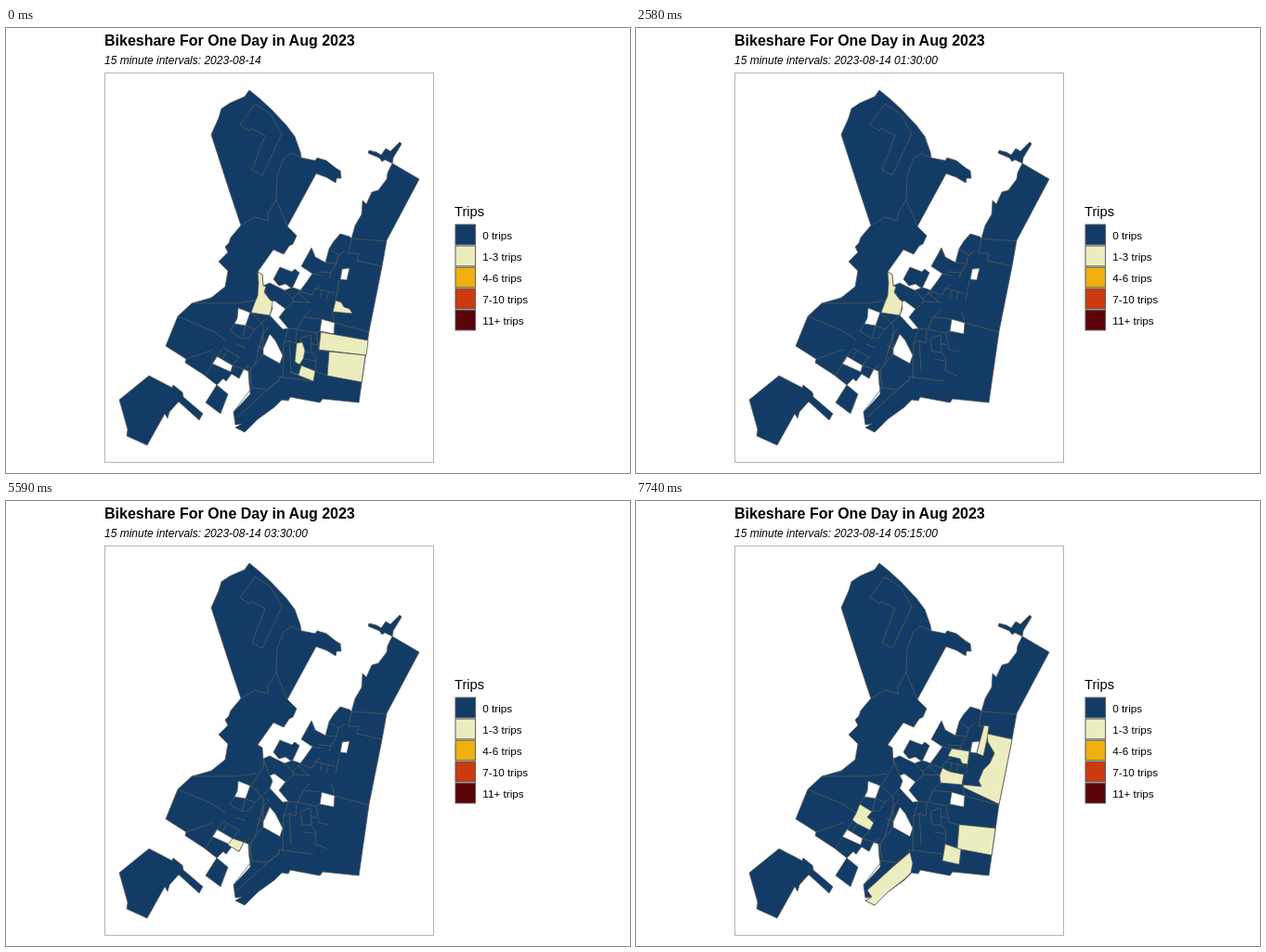
An HTML page for the animation above (8000 ms loop, 672 by 480 pixels).

```html
<!DOCTYPE html>
<html lang="en">
<head>
<meta charset="utf-8">
<title>Bikeshare For One Day</title>
<style>
  html, body { margin: 0; width: 100%; height: 100%; overflow: hidden; background: #fff; }
  svg { display: block; width: 672px; height: 480px; font-family: "Liberation Sans", Arial, sans-serif; }
  .map path { stroke: #595959; stroke-width: .75; stroke-linejoin: round; }
  .land path { fill: #123c65; }
  .holes path { fill: #fff; }
  .lines path { fill: none; }
  .zones path { visibility: hidden; }
</style>
</head>
<body>
<svg viewBox="0 0 672 480">
  <rect width="672" height="480" fill="#fff"/>
  <text x="106" y="19" font-size="16" font-weight="bold">Bikeshare For One Day in Aug 2023</text>
  <text id="clock" x="106" y="39" font-size="12" font-style="italic"></text>
  <rect x="106.5" y="48.5" width="354" height="420" fill="#fff" stroke="#b3b3b3"/>

  <g class="map">
    <g class="land">
      <!-- northern and western wards -->
      <path d="M262 67L273 76L285 87L302 105L311 117L317 134L318 140L333 143L335 140L345 143L355 151L360 154L361 162L356 162L355 167L345 161L334 157L303 214L313 224L309 233L305 235L299 244L288 239L271 263L276 266L277 278L284 310L283 330L277 346L277 352L295 362L295 379L265 392L262 385L261 370L256 368L251 378L243 373L237 381L234 378L227 385L213 374L193 361L194 357L172 343L185 311L200 297L221 291L236 279L239 262L229 252L239 242L236 236L240 232L242 226L253 213L241 177L221 115L229 97L232 87L241 81L257 74Z"/>
      <!-- waterfront and centre -->
      <path d="M277 278L284 275L300 283L308 280L312 281L317 283L323 275L330 265L318 257L329 237L333 247L344 253L348 238L353 230L360 222L370 225L372 227L376 213L383 201L384 186L388 190L394 177L401 175L410 163L411 156L416 146L445 163L410 229L405 257L391 327L380 404L341 400L338 404L306 398L304 402L297 401L289 409L271 422L257 436L247 431L254 427L247 428L245 414L251 408L263 395L262 370L277 352L277 320L264 307L278 285Z"/>
      <path d="M391 132L399 134L404 137L409 130L414 133L424 123L426 125L417 140L416 146L408 142L405 144L402 140L390 135Z"/>
      <path d="M295 258L308 263L311 260L316 264L308 281L301 276L294 278L288 271Z"/>
      <path d="M122 401L154 375L179 388L180 385L190 393L191 398L212 416L208 423L186 403L176 414L174 421L171 416L152 450L130 440L131 433Z"/>
      <path d="M227 385L239 395L231 416L215 404Z"/>
    </g>
    <g class="holes">
      <path d="M284 310L287 302L284 296L289 294L301 303L294 312L304 324L298 325Z"/>
      <path d="M284 330L290 337L298 353L295 362L277 352L277 346Z"/>
      <path d="M250 302L263 307L258 321L246 319L249 313Z"/>
      <path d="M227 354L244 364L242 371L222 362Z"/>
      <path d="M340 314L354 318L353 330L338 327Z"/>
      <path d="M362 260L370 259L367 272L360 271Z"/>
    </g>
    <g class="lines">
      <path d="M252 104L268 82L275 86L285 93L297 114L276 159L265 153L279 116L264 108L262 111Z"/>
      <path d="M318 140L307 135L299 141L292 159L291 185L303 214M291 185L282 200L282 208L268 204L253 213"/>
      <path d="M200 297H247L270 294M185 311L223 327L237 337M223 347L194 357M233 346L223 361M227 354L215 375"/>
      <path d="M246 319L241 327L254 335L262 334M254 335L258 321L268 325L283 311M248 341L258 345M234 345L251 355M238 348L233 357M251 355L244 364L256 368L262 364"/>
      <path d="M268 325L262 334M271 350L277 330L283 322M277 330L268 362L263 370L265 388L281 390L295 379M270 342L277 346M265 388L245 414M249 420L274 397L295 379"/>
      <path d="M372 227L410 230M372 227L369 243L380 243L378 251L405 257M348 238L358 245L365 240M344 253L356 254L358 245M336 263L350 264L356 254M350 264L348 270"/>
      <path d="M330 265L340 267M333 281L339 277M330 288L333 281L354 286M338 292L340 283M345 293L347 285M359 272L355 294"/>
      <path d="M277 278L284 297M300 283L309 292L317 284L330 288M301 303L310 295L328 296M309 292V296M314 285L327 296M328 304L320 312L314 325L304 324M320 312L340 314"/>
      <path d="M351 306L354 318L391 328M314 325L334 329L338 327M334 329L337 347L348 349M304 324L299 340L298 378M299 340L305 337L312 340M305 337L307 371"/>
      <path d="M319 334L328 331L329 350L319 349L317 336ZM329 350L334 356L333 370M328 340L335 342M321 357L333 359M313 326L312 340"/>
      <path d="M333 370L346 375M295 379L293 376L331 381"/>
    </g>
    <g class="zones">
      <path id="upper" d="M253 213L268 204L282 208L282 200L291 185L303 214L313 224L299 244L288 239L271 263V289L270 294L247 297H200L221 291L236 279L239 262L229 252L239 242L236 236Z"/>
      <path id="slope" d="M200 297H247L270 294L264 307L250 302L246 319L241 327L237 337L223 327L185 311Z"/>
      <path id="park" d="M271 263L276 266L277 278L280 279L278 285L284 293L287 295L286 303L284 310L264 307L268 296L271 289L272 275Z"/>
      <path id="tee" d="M263 308L272 319L268 325L258 322Z"/>
      <path id="kite" d="M262 334L270 342L271 349L263 364L252 355L257 345Z"/>
      <path id="hook" d="M241 327L254 335L249 341L256 347L252 355L238 348L233 344L237 337Z"/>
      <path id="bay" d="M223 362L243 373L237 381L234 378L227 385L213 374Z"/>
      <path id="notch" d="M244 364L256 368L251 378L239 371Z"/>
      <path id="point" d="M295 379L298 391L296 401L289 408L271 422L257 436L247 431L254 427L249 420L274 397Z"/>
      <path id="shore" d="M378 251L405 257L391 327L353 309L352 306L372 308L369 302L374 290L381 283L386 272L379 260Z"/>
      <path id="corner" d="M355 294L361 296L364 301L370 303L373 308L352 306Z"/>
      <path id="slim" d="M359 272L368 275L363 296L355 294Z"/>
      <path id="mill" d="M330 288L338 292L353 295L351 306L328 304L327 296Z"/>
      <path id="tall" d="M375 242L380 243L378 257L374 275L367 272Z"/>
      <path id="crown" d="M358 245L373 244L371 259L366 259L364 252L356 254Z"/>
      <path id="peak" d="M329 237L333 247L344 253L333 264L318 257Z"/>
      <path id="step" d="M340 267L359 270L357 284L351 283L349 278L336 275Z"/>
      <path id="ridge" d="M278 279L284 275L300 283L309 292L301 303L289 294L284 293L278 285Z"/>
      <path id="band" d="M339 328L390 337L388 353L337 347Z"/>
      <path id="field" d="M348 349L387 353L383 382L346 375Z"/>
      <path id="pier" d="M350 376L383 382L380 404L333 399L334 390L348 392Z"/>
      <path id="quay" d="M293 376L331 381L330 389L334 390V398L341 400L338 404L306 398L304 402L297 401L298 390Z"/>
      <path id="lane" d="M313 340L319 339L322 348L320 357L316 363L311 360Z"/>
      <path id="wedge" d="M306 371L315 374L318 364L333 370L331 381Z"/>
      <path id="dock" d="M333 370L350 376L348 392L330 388Z"/>
    </g>
  </g>

  <text x="483" y="203" font-size="14.67">Trips</text>
  <g id="legend" font-size="11.73"></g>
</svg>
<script>
const STEP = 430, LOOP = 8000;
const scale = [
  ["0 trips", "#123c65"], ["1-3 trips", "#ecedbe"], ["4-6 trips", "#eeaf0f"],
  ["7-10 trips", "#cc3a0f"], ["11+ trips", "#5b0509"]
];

// Time of day and busy zones; "+" marks the 4-6 class.
const steps = [
  ["", "park corner band field lane wedge"],
  ["00:15", "shore"],
  ["00:30", "bay mill corner band+ wedge quay"],
  ["00:45", "tee"],
  ["01:00", "shore+ corner+ slim pier"],
  ["01:15", "ridge band"],
  ["01:30", "park"],
  ["01:45", "band"],
  ["02:00", "tee crown wedge"],
  ["02:15", "shore"],
  ["02:30", "shore pier"],
  ["02:45", "kite"],
  ["03:00", "shore"],
  ["03:30", "notch"],
  ["03:45", "tee"],
  ["04:15", "peak tall lane field"],
  ["04:30", "upper quay"],
  ["04:45", "slope corner"],
  ["05:15", "hook point shore tall step mill field dock"]
];

const byId = id => document.getElementById(id);
const zones = document.querySelectorAll(".zones path");

byId("legend").innerHTML = scale.map(([label, fill], i) => {
  const y = 212 + i * 23.04;
  return `<rect x="484" y="${y}" width="21.6" height="21.8" fill="${fill}" stroke="#595959"/>
    <text x="513.3" y="${y + 16}">${label}</text>`;
}).join("");

function show([time, busy]) {
  byId("clock").textContent = "15 minute intervals: 2023-08-14" + (time && ` ${time}:00`);
  zones.forEach(z => z.style.visibility = "hidden");
  for (const name of busy.split(" ")) {
    const zone = byId(name.replace("+", ""));
    zone.style.fill = scale[name.endsWith("+") ? 2 : 1][1];
    zone.style.visibility = "visible";
  }
}

let last = -1;
function tick() {
  const i = Math.floor(performance.now() % LOOP / STEP);
  if (i !== last) show(steps[last = i]);
  requestAnimationFrame(tick);
}
tick();
</script>
</body>
</html>
```
